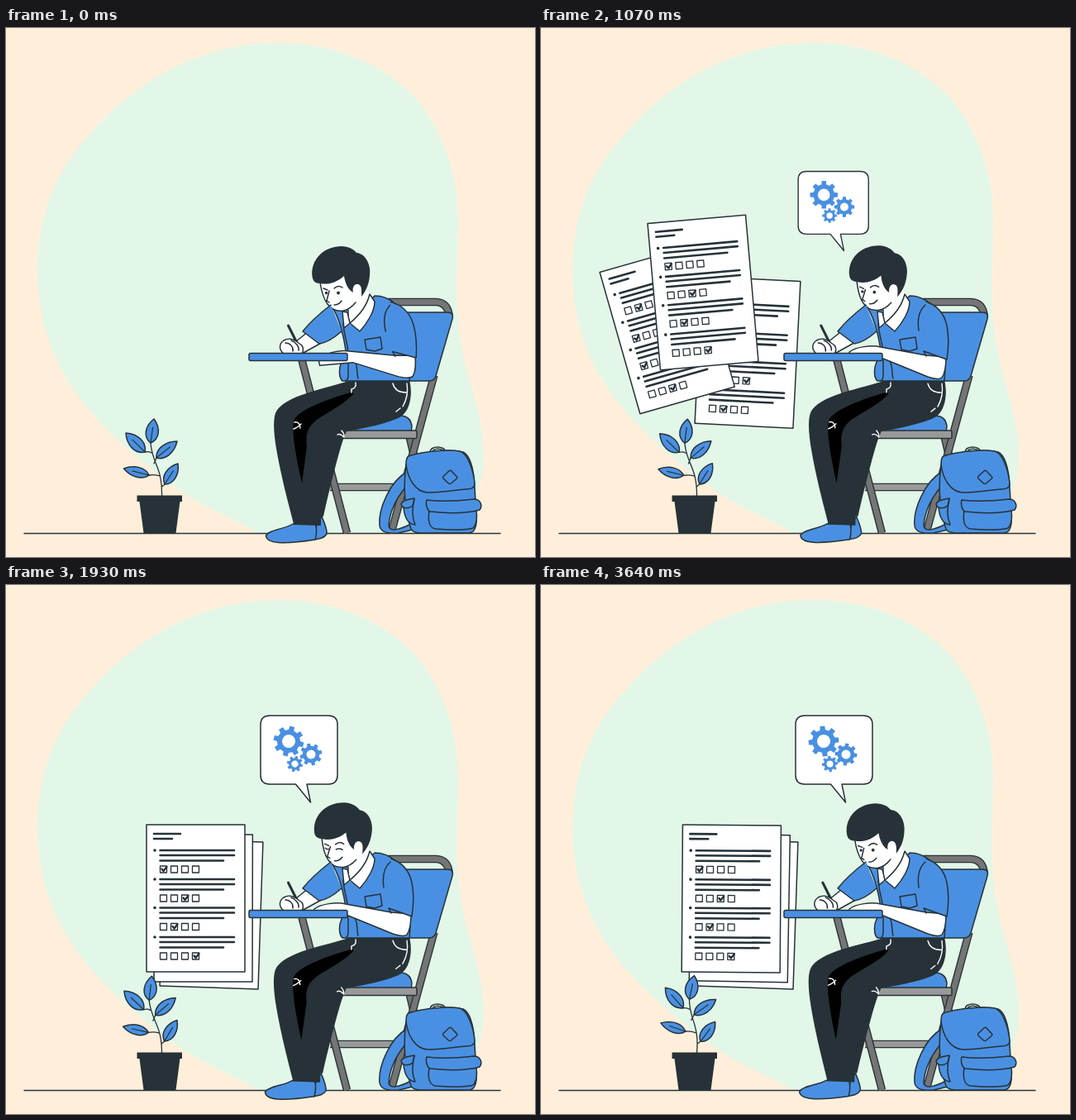
These frames come from a looping animation (640 px wide and 640 px high, 3.71 s). An HTML page:

```html
<!DOCTYPE html>
<html lang="en">
<head>
<meta charset="utf-8">
<title>Student writing a test</title>
<style>
html, body { margin: 0; width: 100%; height: 100%; overflow: hidden; background: #ffefda; }
svg { display: block; width: 100vw; height: 100vh; }
.o { stroke: #263238; stroke-width: 1.5; stroke-linejoin: round; stroke-linecap: round; }
.b { fill: #4a90e2; }
.w { fill: #fff; }
.d { fill: #263238; }
.n { fill: none; }
.chalk { fill: none; stroke: #fff; stroke-width: 1.4; stroke-linecap: round; }
</style>
</head>
<body>
<svg viewBox="0 0 640 640">
  <path fill="#e3f7e8" d="M330 18C400 18 460 45 498 88C530 128 547 180 547 230C547 270 544 300 546 340C549 395 560 420 570 460C578 492 580 520 576 540C568 580 545 611 520 611L305 611C270 590 235 580 190 545C140 505 95 465 68 415C45 372 38 330 38 290C39 230 58 175 100 130C160 60 240 18 330 18Z"/>
  <path class="o n" d="M22 611.5H598"/>

  <g id="sheets"></g>

  <g id="bubble">
    <path class="o w" d="M319 158H390Q401 158 401 169V230Q401 241 390 241H364L368.5 263L350.5 241H319Q308 241 308 230V169Q308 158 319 158Z"/>
    <g id="gears" class="b"></g>
  </g>

  <g id="plant"></g>
  <path class="d" d="M158.500 565.500H213V573H210.500L205.500 611H166.500L161.500 573H158.500Z"/>

  <g id="chair"></g>

  <g id="pack" class="o b">
    <path d="M485 537C465 548 450 582 452 602C453 611 463 612 475 611L496 606L490 600C478 606 464 611 463 602C464 588 470 572 483 556Z"/>
    <path class="n" d="M513 513C513 505 531 505 532 513M516 513C517 508 528 508 529 513"/>
    <path d="M486 520C480 545 481 580 490 606C492 611 500 611 510 611H560C568 611 570 600 569 590L567 555C566 530 560 516 553 513C535 509 500 513 486 520Z"/>
    <path d="M487 518C500 513 535 509 549 512C558 514 566 535 567 552C567 557 562 558 556 558C540 560 525 562 510 562C495 561 486 545 484 528C484 522 485 519 487 518Z"/>
    <path d="M536 536Q537.500 534.500 539 536L545.500 543Q546.500 544 545.500 545L538.500 551Q537 552 535.500 551L529 545Q528 543.500 529 542.500Z"/>
    <path d="M512 584C510 596 512 605 520 606C540 608 560 607 565 605C570 600 570 590 569 584Z"/>
    <path d="M509 571C525 573 548 572 566 570C574 570 577 578 573 583C555 588 530 587 513 585C508 582 508 574 509 571Z"/>
    <path d="M481 580C482 592 486 600 495 601C491 592 491 582 494 570Z"/>
    <path d="M478 576C479 571 490 570 494 569L492 578C488 581 480 583 478 576Z"/>
  </g>

  <g id="legs">
    <path class="o b" d="M376 601L382 591C385 598 389 607 388 612C385 617 380 618 373 619Z"/>
    <path class="o b" d="M347 600C338 606 318 607 314.500 614C315 624 335 625 374 619C376 612 376 605 374 599Z"/>
    <path class="d" d="M414 427C390 436 335 444 326 466C322 478 325 500 330 525C336 555 343 580 348 600L347 601L381 602L381 591L384 591C388 572 394 548 400 525C404 510 408 496 412 488C430 485 465 478 478 470C490 462 492 440 488 426Z"/>
    <path d="M420 440C395 447 351 462 348 476C346 492 350 515 358 551L364 506C362 490 366 482 376 474C390 464 410 455 420 443Z"/>
    <path class="chalk" d="M348 485C352 484 355 481 357 479M349 477C353 476 356 479 356 484M401 492C404 490 407 493 409 495M406 487C408 489 409 492 409 494M423 429C424 435 421 436 418 437V441M468 430C470 438 477 441 484 441M485 430C487 442 484 451 480 458M477 460L472 464"/>
  </g>

  <g id="torso">
    <path class="o b" d="M393 335C402 348 408 370 411 390L404 410Q402 422 407 427H488C490 408 489 380 485 358C480 338 465 324 446 324L425 345Z"/>
    <path class="o n" d="M434 377L453 374L455 388L446 391L436 389ZM414 402V420Q414 425 411 427M422 403C426 410 424 418 426 424M408 358C409 372 414 384 414 394"/>
    <path class="w" d="M413 335V359L418 358C430 350 440 335 440 320Z"/>
    <path class="o n" d="M414 341V355"/>
    <path class="o w" d="M407 343L409 363L416 357L413 344Z"/>
    <path class="o w" d="M416 357L428 367C438 356 446 342 446 331L440 322C437 335 427 348 416 357Z"/>
  </g>

  <g id="head">
    <path class="w" d="M380 306C382 320 384 329 388 333L391 333C393 340 400 343 408 342C414 341 419 338 422 333L438 322L434 300L409 290Z"/>
    <path class="o n" d="M380 308C382 320 385 329 389 334C393 340 400 343 408 342C414 341 419 337 423 332M391 318L388 330L391 332M397 335C401 335 404 333 406 330M384 315L389 317M397 315C400 312 404 312 407 314" stroke-width="1.300"/>
    <path class="d" d="M371 303C367 285 380 265 405 264C415 264 421 268 424 272C436 273 442 288 440 300C439 312 434 320 430 325C431 315 428 309 424 310C420 311 419 316 420 320C414 317 410 308 409 300C400 308 390 311 380 309C374 309 372 306 371 303Z"/>
    <path class="w" d="M421 322C419 315 421 310 425 310C430 310 431 317 429 322C427 326 423 326 421 322Z"/>
    <g id="open" class="d"><circle cx="387.500" cy="320.500" r="1.700"/><circle cx="402" cy="320.500" r="1.900"/></g>
    <path id="shut" class="o n" d="M385 320Q387 322 389 321M398 321Q402 319 406 321"/>
  </g>

  <g id="hand">
    <path class="o w" d="M366 367L350 380L358 394L385 379Z"/>
    <path class="o n" style="stroke-width:3" d="M341.500 360L352 381"/>
    <path class="o w" d="M336 394C330 389 330 382 336 378C341 375 347 376 351 379L358 384Q361 389 358 394Z"/>
    <path class="o n" d="M338 381C344 381 348 386 347 391M345 378C351 380 355 386 354 390"/>
  </g>
  <path class="o b" d="M393 335C380 345 366 358 359 367L379 382C388 381 398 374 406 367"/>

  <g id="arm">
    <path class="o w" d="M374 400L373 392C380 386 400 383 411 386L466 396L490 398C490 410 488 419 485 423C481 426 474 424 468 422L414 400Z"/>
    <path class="b" d="M462 334C454 350 455 372 464 391L491 401C494 385 494 362 488 349C482 338 472 332 462 334Z"/>
    <path class="o n" d="M465 335C457 342 455 352 457 366M466 331C480 336 488 346 491 360C494 375 493 388 491 401L463 391L466 397"/>
  </g>
  <rect class="o b" x="294" y="393.500" width="119" height="9" rx="2"/>
</svg>
<script>
const LOOP = 3710;
const $ = id => document.getElementById(id);
const clamp = v => Math.max(0, Math.min(1, v));

// Monotone cubic through [time, value...] rows, read at column c.
function track(keys, t, c = 1) {
  const last = keys.length - 1;
  if (t <= keys[0][0]) return keys[0][c];
  if (t >= keys[last][0]) return keys[last][c];
  let i = 0;
  while (t > keys[i + 1][0]) i++;
  const rate = j => (keys[j + 1][c] - keys[j][c]) / (keys[j + 1][0] - keys[j][0]);
  const slope = j => {
    if (j <= 0 || j >= last) return 0;
    const a = rate(j - 1), b = rate(j);
    return a * b <= 0 ? 0 : 2 * a * b / (a + b);
  };
  const span = keys[i + 1][0] - keys[i][0];
  const u = (t - keys[i][0]) / span, v = 1 - u;
  return v * v * (1 + 2 * u) * keys[i][c] + u * u * (3 - 2 * u) * keys[i + 1][c]
    + span * u * v * (v * slope(i) - u * slope(i + 1));
}

function sheet(id, ticks) {
  let lines = "M9 11H41M9 17H31", marks = "", boxes = "", dots = "";
  [31, 66, 100.5, 136].forEach((y, row) => {
    lines += `M16.500 ${y}H106M16.500 ${y + 6}H106M16.500 ${y + 12.5}H93`;
    dots += `<circle class="d" cx="10" cy="${y}" r="1.800"/>`;
    for (let k = 0; k < 4; k++) boxes += `M${16.5 + 13 * k} ${y + 19}h8v8h-8z`;
    const x = 16.5 + 13 * ticks[row];
    marks += `M${x + 2} ${y + 22.5}l2 2.500 4-5`;
  });
  return `<g id="${id}"><g transform="translate(-59.500 -89)">
    <rect class="o w" width="119" height="178" stroke-width="1.500"/>
    <path class="o n" style="stroke-width:2.600" d="${lines}"/>${dots}
    <path class="o n" style="stroke-width:1.300" d="${boxes}"/>
    <path class="o n" style="stroke-width:2.400" d="${marks}"/></g></g>`;
}

function gear(r, hole) {
  let d = "";
  for (let i = 0; i < 8; i++)
    [[-13, 0.76], [-9, 1], [9, 1], [13, 0.76]].forEach(([off, k]) => {
      const a = (i * 45 + off - 90) * Math.PI / 180;
      d += `${d ? "L" : "M"}${(r * k * Math.cos(a)).toFixed(2)} ${(r * k * Math.sin(a)).toFixed(2)}`;
    });
  return `<path fill-rule="evenodd" d="${d}ZM${-hole} 0a${hole} ${hole} 0 1 0 ${2 * hole} 0a${hole} ${hole} 0 1 0 ${-2 * hole} 0Z"/>`;
}

function leaf(x, y, tx, ty, w) {
  const dx = tx - x, dy = ty - y, len = Math.hypot(dx, dy);
  const p = (f, s) => `${x + dx * f - dy / len * s} ${y + dy * f + dx / len * s}`;
  return `<path class="o b" d="M${x} ${y}C${p(0.2, w)} ${p(0.65, w)} ${tx} ${ty}C${p(0.65, -w)} ${p(0.2, -w)} ${x} ${y}Z"/>
    <path class="o n" style="stroke-width:1.200" d="M${x} ${y}L${p(0.65, 0)}"/>`;
}

const tube = (d, color = "#757575") =>
  `<path d="${d}" fill="none" stroke="#263238" stroke-width="9.500"/><path d="${d}" fill="none" stroke="${color}" stroke-width="6.800"/>`;

$("sheets").innerHTML = sheet("back", [2, 0, 3, 1]) + sheet("mid", [1, 0, 0, 2]) + sheet("front", [0, 2, 1, 3]);

const gears = [[342, 189, 18.5, 8, 1], [369, 205, 13.5, 5.5, -1], [349.5, 216.5, 9.7, 4, 1]];
$("gears").innerHTML = gears.map(g => gear(g[2], g[3])).join("");

$("plant").innerHTML =
  `<path class="o n" style="stroke-width:1.300" d="M188.500 567C189 548 186 538 181 526C178 518 175 508 175 501M173 541Q180 540 186 542M182 520L179 527M168 513Q173 512 176 514M192 552L188.500 555"/>`
  + leaf(175, 502, 179, 473, 10) + leaf(168, 513, 145, 490, 10) + leaf(182, 520, 207, 500, 9)
  + leaf(173, 541, 142.5, 533, 8) + leaf(192, 552, 208, 527, 9);

$("chair").innerHTML =
  tube("M487 490L515 608") + tube("M392 555.500H480", "#999") + tube("M518 420L466 611")
  + tube("M358 402L412.500 611")
  + tube("M462 331.500H520Q535 332 536.500 350")
  + `<path class="o b" d="M440 344H534Q542 344 540 352L520 421Q518 427 512 427H440Z"/>
     <path class="o b" d="M362 490C362 478 375 470 390 470L478 469Q490 470 491 482L490 490Z"/>
     <rect class="o" fill="#999" x="358" y="487" width="139" height="9.500" rx="1.500"/>`;

const poses = {
  back: [[500, 250, 258.4, 2.9], [1070, 250, 392.4, 2.9], [1430, 249.4, 398.2, 2.6], [1930, 248.5, 398, 1.9]],
  mid: [[500, 158, 271, -30.6], [1070, 152.7, 364.8, -15.9], [1430, 178, 386, -10.7], [1900, 238.5, 391, 0], [2430, 240.3, 390.7, 1]],
  front: [[500, 203, 251.5, 6.7], [1070, 196, 320, -5], [1430, 206.5, 344, -3.8], [1930, 229.5, 379, 0], [2430, 230.3, 379.5, 0.4]]
};
const pop = [[640, 0.3], [1070, 0.915], [1140, 1.02], [1210, 1.085], [1420, 1]];
const sway = [[0, 0], [500, 3.7], [1070, -1], [1430, -4], [1790, -3.4], [1930, -1.6], [2430, 0], [2860, -1.8], [3200, -1], [3640, 4], [3710, 4.2]];
const nod = [[0, 0], [400, 3], [1950, 3], [2420, 0], [3640, -0.7], [3710, -0.6]];
const reach = [[0, -5], [450, -0.3], [900, 0]];

const put = (id, value) => $(id).setAttribute("transform", value);
const show = (id, alpha) => $(id).setAttribute("opacity", alpha);

function draw(t) {
  for (const id in poses) {
    const k = poses[id];
    put(id, `translate(${track(k, t, 1)} ${track(k, t, 2)}) rotate(${track(k, t, 3)})`);
    show(id, clamp((t - 40) / 300));
  }
  put("bubble", `translate(345 340) scale(${track(pop, t)}) translate(-345 -340)`);
  show("bubble", clamp((t - 720) / 260));
  const spin = (t - 1070) * 0.068;
  gears.forEach((g, i) =>
    $("gears").children[i].setAttribute("transform", `translate(${g[0]} ${g[1]}) rotate(${spin * g[4]})`));

  put("plant", `rotate(${track(sway, t)} 188 566)`);
  put("head", `rotate(${track(nod, t)} 420 345)`);
  put("arm", `rotate(${track(reach, t)} 470 340)`);
  put("legs", `rotate(${0.6 * t / LOOP} 430 435)`);
  put("hand", `translate(${-1.4 * (1 - Math.cos(t * 2 * Math.PI / 240))} 0)`);
  const blink = t > 1850 && t < 2010;
  show("open", blink ? 0 : 1);
  show("shut", blink ? 1 : 0);
}

let start;
function tick(now) {
  if (start === undefined) start = now;
  draw((now - start) % LOOP);
  requestAnimationFrame(tick);
}
draw(0);
requestAnimationFrame(tick);
</script>
</body>
</html>
```
